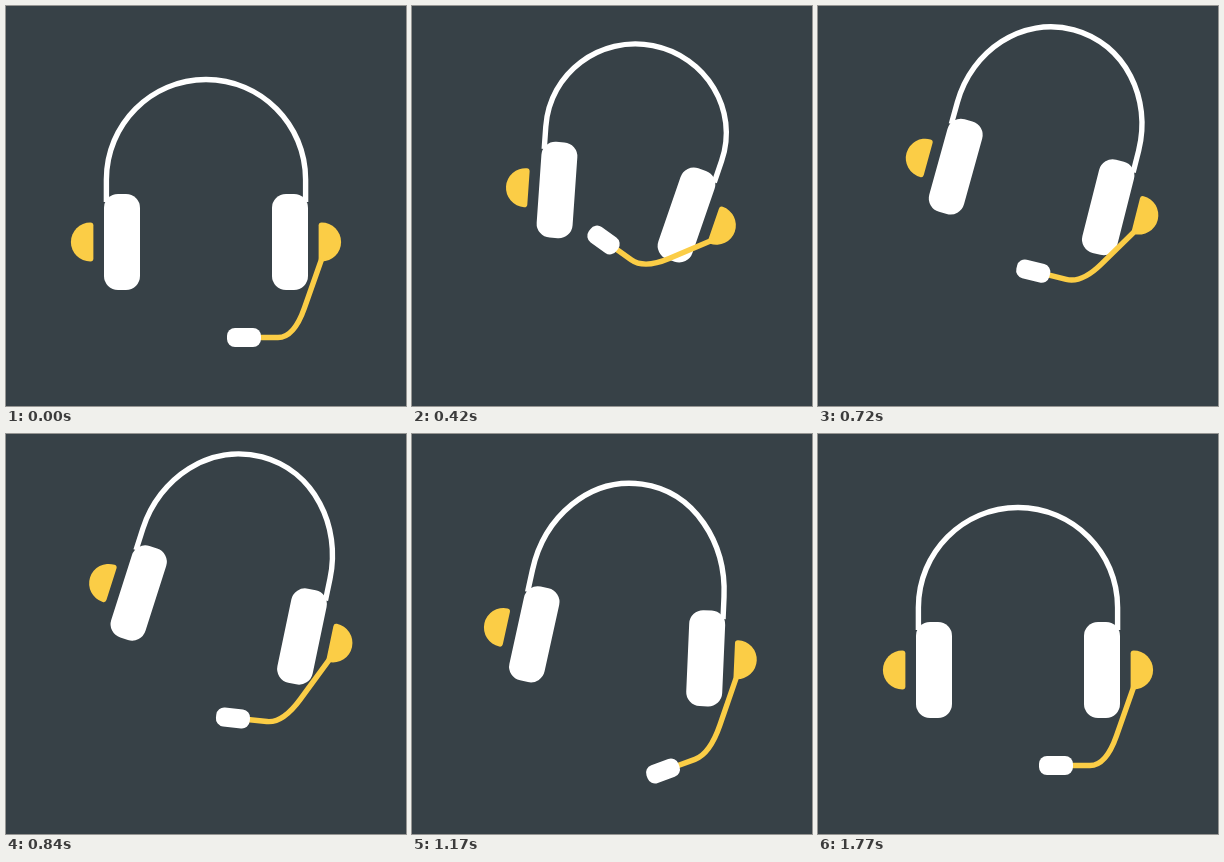
Animation of 400x400 px, one loop 3800 ms. Source, as an HTML page:

```html
<!DOCTYPE html>
<html lang="en">
<head>
<meta charset="utf-8">
<title>Jumping headset</title>
<style>
  html, body { margin: 0; width: 100%; height: 100%; overflow: hidden; background: #374147; }
  svg { display: block; width: 100%; height: 100%; }
  .white { fill: #fff; }
  .yellow { fill: #fbcd46; }
  .line { fill: none; stroke-width: 5.4; }
</style>
</head>
<body>
<svg viewBox="0 0 400 400">
  <defs>
    <g id="side">
      <rect class="white" x="-18" y="-48" width="36" height="96" rx="14"/>
      <path class="yellow" d="M28.6-16.5q0-3 3-3a19.5 19.5 0 0 1 0 39q-3 0-3-3z"/>
    </g>
  </defs>
  <path id="band" class="line" stroke="#fff"/>
  <g id="left"><use href="#side" transform="scale(-1 1)"/></g>
  <g id="right"><use href="#side"/></g>
  <path id="boom" class="line" stroke="#fbcd46"/>
  <g id="mic"><rect class="white" x="-17" y="-9.5" width="34" height="19" rx="8"/></g>
</svg>
<script>
const LOOP = 3800, STEP = 30, RAD = Math.PI / 180;
const REST = [116, 236, 0, 284, 236, 0, 238, 331.5, 0];

// time, then x, y, angle of the left cup, the right cup and the microphone
const KEYS = [
  [0, ...REST],
  [200, 116, 273, 0, 284, 273, 0, 240, 373, -3],
  [420, 145, 184, 4, 274.5, 209, 19, 191.5, 234, 35.5],
  [600, 141.5, 164.5, 12, 285, 200.5, 16, 206.5, 251, 21],
  [840, 132.7, 159, 17.7, 296, 202.5, 11.8, 227, 284, 6],
  [970, 124.5, 165, 18.5, 308, 203, 4, 268, 325, -16],
  [1080, 125, 177, 14.5, 295.5, 211, 5, 262, 337, -27],
  [1170, 122.3, 200.3, 12.4, 293.7, 224.3, 2.5, 251, 337, -20],
  [1295, 116, 255, 0, 284, 255, 0, 240, 352, -4],
  [1410, 116, 243.2, 0, 284, 243.2, 0, 234, 334.5, 3],
  [1530, 116, 236, 0, 284, 236, 0, 237, 331, 1],
  [1620, 116, 236, 0, 284, 236, 0, 239.5, 333.5, -2],
  [1770, ...REST]
];

const slope = (i, c) => (KEYS[i + 1][c] - KEYS[i][c]) / (KEYS[i + 1][0] - KEYS[i][0]);

// Monotone tangent: flat at the ends and at every turning point
function tangent(i, c) {
  if (i === 0 || i === KEYS.length - 1) return 0;
  const a = slope(i - 1, c), b = slope(i, c);
  return a * b > 0 ? 2 * a * b / (a + b) : 0;
}

function poseAt(time) {
  const i = KEYS.findIndex((key, n) => n && time < key[0]) - 1;
  if (i < 0) return REST;
  const span = KEYS[i + 1][0] - KEYS[i][0];
  const u = (time - KEYS[i][0]) / span, v = 1 - u;
  return REST.map((_, n) => {
    const c = n + 1;
    return KEYS[i][c] * v * v * (1 + 2 * u) + KEYS[i + 1][c] * u * u * (1 + 2 * v)
      + span * u * v * (tangent(i, c) * v - tangent(i + 1, c) * u);
  });
}

// Point (dx, dy) of a part placed at [x, y, angle]
function place([x, y, angle], dx, dy) {
  const c = Math.cos(angle * RAD), s = Math.sin(angle * RAD);
  return [x + dx * c - dy * s, y + dx * s + dy * c];
}

const mix = (p, q, k) => [p[0] + (q[0] - p[0]) * k, p[1] + (q[1] - p[1]) * k];
const dist = (p, q) => Math.hypot(q[0] - p[0], q[1] - p[1]);
const handle = (p, q, turn) => dist(p, q) / (3 * Math.cos(turn * RAD / 4) ** 2);

function bandPath(left, right) {
  const a = place(left, -15.6, -62.5), b = place(right, 15.6, -62.5);
  const tilt = Math.atan2(b[1] - a[1], b[0] - a[0]) / RAD;
  const top = [...place([...mix(a, b, .5), tilt], 0, -100), tilt];
  const ha = handle(a, top, 90 + tilt - left[2]);
  const hb = handle(b, top, 90 + right[2] - tilt);
  return `M${place(left, -15.6, -40)}L${a}`
    + `C${place([...a, left[2]], 0, -ha)} ${place(top, -ha, 0)} ${place(top, 0, 0)}`
    + `C${place(top, hb, 0)} ${place([...b, right[2]], 0, -hb)} ${b}`
    + `L${place(right, 15.6, -40)}`;
}

function boomPath(right, mic) {
  const base = place(right, 32, 16), corner = place(mic, 50, 0);
  return `M${base}L${mix(corner, base, .37)}Q${corner} ${place(mic, 34, 0)}L${place(mic, 0, 0)}`;
}

const el = id => document.getElementById(id);
const move = (id, [x, y, angle]) =>
  el(id).setAttribute('transform', `translate(${x} ${y}) rotate(${angle})`);

function draw() {
  const time = Math.floor(performance.now() % LOOP / STEP) * STEP;
  const pose = poseAt(time);
  const left = pose.slice(0, 3), right = pose.slice(3, 6), mic = pose.slice(6);
  move('left', left);
  move('right', right);
  move('mic', mic);
  el('band').setAttribute('d', bandPath(left, right));
  el('boom').setAttribute('d', boomPath(right, mic));
  requestAnimationFrame(draw);
}
draw();
</script>
</body>
</html>
```
